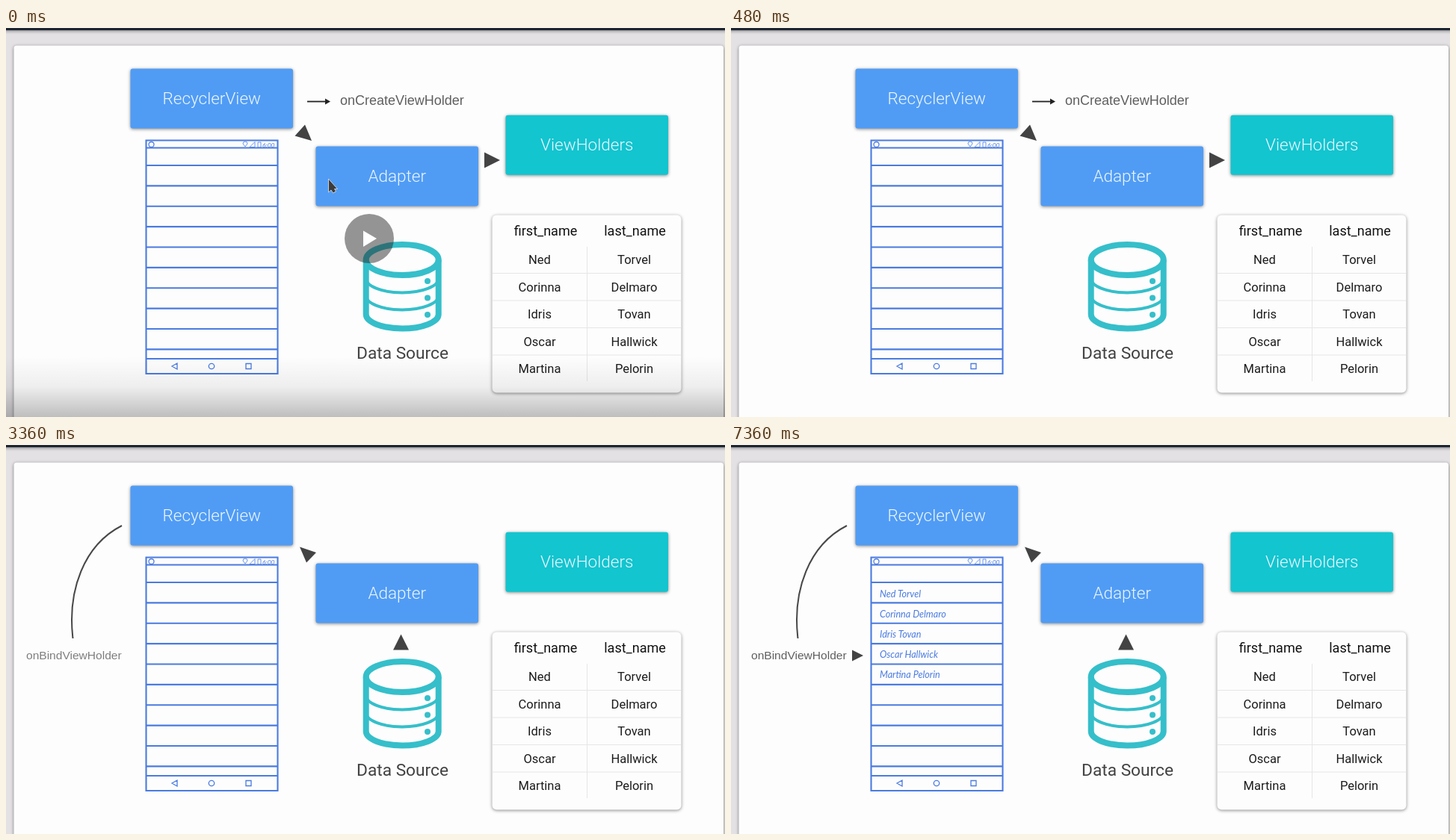
Animation of 962 by 521 pixels, one loop 8000 ms. Source, as an HTML page:

```html
<!DOCTYPE html>
<html lang="en">
<head>
<meta charset="utf-8">
<title>List adapter flow</title>
<style>
  html, body { margin: 0; height: 100%; overflow: hidden; background: #e3e1e4; }
  svg { display: block; width: 100vw; height: 100vh; }
  text { font-family: Roboto, sans-serif; text-anchor: middle; }
  .card { filter: drop-shadow(0 1.5px 2px #0007); }
  .box text { font-size: 22.5px; font-weight: 300; fill: #eef6ff; }
  .method { font-family: "Liberation Sans", Arial, sans-serif; fill: #5f5f5f; text-anchor: start; }
  .head { font-size: 18px; fill: #111; }
  .cell { font-size: 16.5px; fill: #1c1c1c; }
  .hand { font: italic 12.6px Lato, sans-serif; fill: #4a7be0; text-anchor: start; }
  .ink { fill: none; stroke: #4a7be0; stroke-width: 2.1; }
  .arrow { fill: #434343; }
  .db { fill: none; stroke: #35bfca; }
</style>
</head>
<body>
<svg viewBox="0 0 962 521" preserveAspectRatio="none">
  <defs>
    <linearGradient id="shade" x2="0" y2="1">
      <stop offset="0" stop-opacity="0"/>
      <stop offset=".5" stop-opacity=".06"/>
      <stop offset="1" stop-opacity=".25"/>
    </linearGradient>
    <clipPath id="wipe"><rect id="wipeRect" x="161" y="270" height="24"/></clipPath>
  </defs>

  <rect width="962" height="521" fill="#e3e1e4"/>
  <rect class="card" x="-10" y="-10" width="982" height="13" fill="#1d2632"/>
  <rect class="card" x="10.5" y="23.5" width="949.5" height="540" rx="4" fill="#fdfdfd"/>

  <g id="boxes"></g>

  <g class="ink">
    <path id="phone"/>
    <g stroke-width="1.3">
      <circle cx="194.5" cy="156" r="3.5"/>
      <path d="M320 159l-3-4a3 3 0 1 1 6 0zM326 159.5h7v-7zM337 153h4v7h-4z" stroke-width=".8"/>
      <path d="M229 449v8l-7-4zM321 449.5h7v7h-7z"/>
      <circle cx="275" cy="453" r="3.7"/>
    </g>
  </g>
  <text class="hand" x="343" y="159.5" style="font-size:8.5px">6:00</text>

  <g class="db">
    <ellipse cx="530.2" cy="310.5" rx="48.5" ry="20.5" stroke-width="8"/>
    <path d="M481.7 310.5V383.5a48.5 19 0 0 0 97 0V310.5" stroke-width="8"/>
    <path d="M481.7 335.5a48.5 19 0 0 0 97 0M481.7 358.5a48.5 19 0 0 0 97 0" stroke-width="4"/>
    <g fill="#35bfca" stroke="none">
      <circle cx="564" cy="339" r="4"/><circle cx="564" cy="361.5" r="4"/><circle cx="564" cy="384" r="4"/>
    </g>
  </g>
  <text x="530.5" y="442.5" font-size="22.7" fill="#424242">Data Source</text>

  <rect class="card" x="650.5" y="250.5" width="253" height="238" rx="6" fill="#fdfdfd"/>
  <path d="M651 328.5h252M651 365h252M651 401.5h252M651 438h252M777.5 293V473" stroke="#e6e6e6" fill="none"/>
  <text class="head" x="722" y="278">first_name</text>
  <text class="head" x="841.5" y="278">last_name</text>
  <g id="table"></g>

  <g id="create">
    <path d="M403 98.5h26" stroke="#222" stroke-width="1.8"/>
    <path d="M427 94.5l7 4-7 4z" fill="#222"/>
    <text class="method" x="447" y="103" font-size="18">onCreateViewHolder</text>
    <path class="arrow" d="M400 129.5L409 151L386.5 144.5zM640 166.5L661 177L640 187.5z"/>
  </g>
  <path id="fetch" class="arrow" d="M393 136.5L415 144L402 157.5zM528.5 253.5L539 274.5H518z"/>

  <path id="curve" d="M155 108C104 134 82 195 89.5 259" pathLength="1" stroke-dasharray="1 2"
    fill="none" stroke="#484848" stroke-width="2"/>
  <text id="bind" class="method" x="27" y="287" font-size="15.55">onBindViewHolder</text>
  <path class="arrow" d="M162 274.5L177 282L162 289.5z" clip-path="url(#wipe)"/>
  <g id="list"></g>

  <rect id="controls" y="440" width="962" height="81" fill="url(#shade)"/>
  <g id="play">
    <circle cx="486" cy="282" r="33" fill="#222" fill-opacity=".48"/>
    <path d="M478 271.5L496 282L478 293z" fill="#fff"/>
  </g>
  <path id="cursor" d="M431.5 202v18l3.5-3 2.5 4 4-2-2-3.500h4z" fill="#3c3c3c" stroke="#e4e4e4" stroke-width=".8"/>
</svg>
<script>
const $ = id => document.getElementById(id);
const people = [["Ned", "Torvel"], ["Corinna", "Delmaro"], ["Idris", "Tovan"],
  ["Oscar", "Hallwick"], ["Martina", "Pelorin"]];

const box = (x, y, color, label) => `<g class="box">
  <rect class="card" x="${x}" y="${y}" width="217.5" height="80" rx="3" fill="${color}"/>
  <text x="${x + 108.75}" y="${y + 47.5}">${label}</text></g>`;
$("boxes").innerHTML = box(166.5, 54.5, "#509cf5", "RecyclerView") +
  box(414.5, 158.5, "#509cf5", "Adapter") + box(668.5, 116.75, "#12c5cf", "ViewHolders");

const rows = [160.5, 443, ...Array.from({ length: 10 }, (_, i) => 184 + 27.37 * i)];
$("phone").setAttribute("d", "M187.5 150.5H363.5V463H187.5z" +
  rows.map(y => `M187.5 ${y}H363.5`).join(""));

$("table").innerHTML = people.map(([first, last], i) => {
  const y = 316.3 + 36.4 * i;
  return `<text class="cell" x="714" y="${y}">${first}</text>
    <text class="cell" x="840.5" y="${y}">${last}</text>`;
}).join("");
$("list").innerHTML = people.map((name, i) =>
  `<text class="hand" x="199" y="${203.5 + 27.2 * i}">${name.join(" ")}</text>`).join("");

const STEP = 160, LOOP = 8000;
const ramp = (t, from, to) => Math.min(1, Math.max(0, (t - from) / (to - from)));
const fade = (id, opacity) => $(id).style.opacity = opacity;

function draw(t) {
  // The play button swells and fades before vanishing.
  const swell = ramp(t, 0, 320);
  fade("play", 1 - swell);
  $("play").setAttribute("transform", `translate(486 282) scale(${1 + 0.8 * swell}) translate(-486 -282)`);
  fade("cursor", t < STEP ? 1 : 0);
  fade("controls", t < 320 ? 1 : t < 480 ? 0.85 : 0);

  const swap = ramp(t, 1440, 1760);
  fade("create", 1 - swap);
  fade("fetch", swap);

  const drawn = ramp(t, 2090, 2520);
  $("curve").setAttribute("stroke-dashoffset", 1 - drawn);
  fade("curve", drawn > 0 ? 1 : 0);
  fade("bind", Math.min(ramp(t, 3040, 3440), t < 3840 ? 0.85 : 1));
  $("wipeRect").setAttribute("width", 17 * ramp(t, 4160, 4640));
  fade("list", ramp(t, 4640, 4960));
}

function tick() {
  const t = performance.now() % LOOP;
  draw(Math.floor(t / STEP) * STEP);
  requestAnimationFrame(tick);
}
tick();
</script>
</body>
</html>
```
